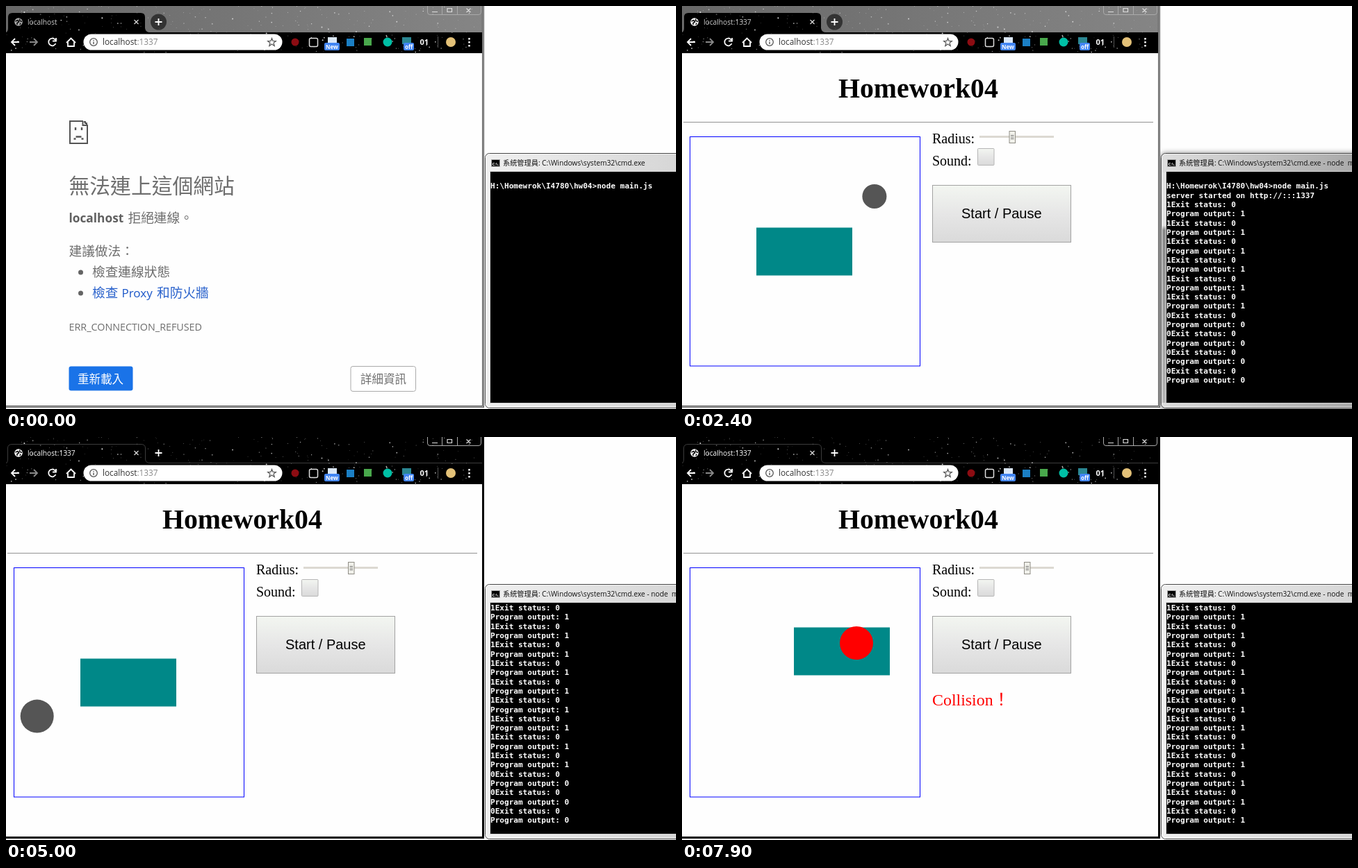
Recreate the animation shown at these times as an HTML page. Size 964 by 581 pixels, loop 8 s.

```html
<!DOCTYPE html>
<html lang="zh-Hant">
<head>
<meta charset="utf-8">
<title>Homework04</title>
<style>
html, body { margin: 0; width: 100%; height: 100%; overflow: hidden; background: #fefefe; }
svg { display: block; }
text { white-space: pre; font-family: "Open Sans", "Noto Sans CJK TC", "Noto Sans CJK", sans-serif; }
.serif text { font-family: "Liberation Serif", "Noto Sans CJK TC", "Noto Sans CJK", serif; font-size: 20px; }
#console text { font: bold 11.07px "DejaVu Sans Mono", monospace; fill: #fff; }
#error text { fill: #6e6e6e; font-size: 18.7px; font-weight: 300; }
.line { fill: none; stroke: #fff; stroke-width: 1.8; }
.thin { fill: none; stroke: #ddd; stroke-width: 1.2; }
</style>
</head>
<body>
<svg width="964" height="581" viewBox="0 0 964 581">
  <defs>
    <linearGradient id="strip"><stop stop-color="#686868"/><stop offset="1" stop-color="#858585"/></linearGradient>
    <linearGradient id="key" x2="0" y2="1"><stop stop-color="#f3f6f1"/><stop offset=".5" stop-color="#e6e6e6"/><stop offset="1" stop-color="#dadada"/></linearGradient>
    <linearGradient id="focused"><stop stop-color="#dedede"/><stop offset="1" stop-color="#a2a2a2"/></linearGradient>
    <linearGradient id="blurred"><stop stop-color="#f0f0f0"/><stop offset="1" stop-color="#d2d2d2"/></linearGradient>
    <linearGradient id="side" x2="0" y2="1"><stop offset=".23" stop-color="#e4e4e4"/><stop offset=".25" stop-color="#8c8c8c"/><stop offset="1" stop-color="#b8b8b8"/></linearGradient>
    <filter id="shade" x="-10%" y="-10%" width="120%" height="120%"><feDropShadow dx="0" dy="1" stdDeviation="4" flood-opacity=".6"/></filter>
    <clipPath id="frame"><rect width="964" height="581"/></clipPath>
  </defs>

  <!-- command window -->
  <g clip-path="url(#frame)">
    <rect id="win" x="689.5" y="212.5" width="320" height="367" rx="6" stroke="#444"/>
    <rect x="690.5" y="213.5" width="318" height="365" rx="5" fill="none" stroke="#fff" stroke-opacity=".7"/>
    <rect id="edge" x="691" y="240" width="5" height="332" fill="url(#side)"/>
    <rect x="696.5" y="238.500" width="300" height="334" stroke="#d4d4d4"/>
    <rect x="698.5" y="221.5" width="12" height="10" fill="#000" stroke="#aaa"/>
    <text x="699.5" y="229.5" font-size="6" font-weight="bold" fill="#fff">C:\.</text>
    <text x="715" y="230" font-size="10.2" fill="#111">系統管理員:</text>
    <text id="caption" x="771" y="230" font-size="10.2" fill="#111"></text>
    <g id="console"></g>
    <rect id="caret" x="931" y="263" width="6" height="3" fill="#fff"/>
  </g>

  <!-- browser frame -->
  <rect width="688" height="579" fill="#fefefe"/>
  <rect width="688" height="68"/>
  <g id="idle">
    <rect width="688" height="38" fill="url(#strip)"/>
    <path d="M0 38Q3 37 3 32V16Q3 10 9 10H194Q200 10 200 16V32Q201 38 207 38Z"/>
    <circle cx="219.5" cy="23" r="11.5" fill="#333"/>
  </g>
  <path id="tabline" d="M0 37.5Q2.5 37 2.5 32V16Q2.5 10.5 9 10.5H194Q200.5 10.5 200.5 16V32Q201 37.5 207 37.5H686" fill="none" stroke="#3c3c3c"/>
  <g id="stars" fill="#fff"></g>
  <path id="border" d="M686.5 0V577.5H0" fill="none" stroke-width="3"/>
  <path id="groove" d="M686.5 0V577.5H0" fill="none" stroke="#b4b4b4"/>
  <path d="M606.5 0V9Q606.5 12.5 610 12.5H680Q683.5 12.5 683.5 9V0M627.5 0V12M649.5 0V12" fill="none" stroke="#aaa"/>
  <path d="M613 8.5H621M635 3.500H641.500V8.500H635ZM662.5 3.500L668.500 9M668.500 3.500L662.500 9" class="thin"/>
  <path d="M219.5 18V28M214.5 23H224.5" class="line"/>
  <path d="M184.5 20L190.5 26M190.5 20L184.5 26" class="thin"/>
  <g id="globe"><circle cx="18" cy="23" r="5.8"/><path d="M13.5 22L17 20.5L18.5 23L16 24.5V27M20 18.5L19.5 21L23 22.5M20 27L21 24.5" fill="none" stroke="#111" stroke-width="1.6"/></g>
  <path id="spin" d="M19 18A5 5 0 0 1 20 28" class="line"/>
  <text id="tab" x="31" y="27" font-size="10.2"></text>
  <path d="M19 52H8M13 47L8 52L13 57" class="line"/>
  <path d="M34 52H45M40 47L45 52L40 57" class="line" style="stroke:#888"/>
  <path id="reload" d="M71 49A5.3 5.3 0 1 0 71.5 54M72 46V50.5H67" class="line"/>
  <path id="stop" d="M62 47.5L71 56.5M71 47.5L62 56.5" class="line"/>
  <path d="M87 53L93.5 46.5L100 53M89 52V58H98V52" class="line"/>
  <rect x="111.5" y="40.5" width="286" height="23" rx="11.5" fill="#fff"/>
  <circle cx="126" cy="52" r="5.3" fill="none" stroke="#555" stroke-width="1.3"/>
  <path d="M126 49V50.3M126 51.5V55" stroke="#555" stroke-width="1.4"/>
  <text x="139" y="56" font-size="11.8" fill="#333">localhost<tspan fill="#888">:1337</tspan></text>
  <path d="M382.5 46.5L384 50.5H388.3L385 53.2L386.2 57.5L382.5 55L378.8 57.5L380 53.2L376.7 50.5H381Z" fill="none" stroke="#555" stroke-width="1.2"/>
  <circle cx="416" cy="52" r="5.5" fill="#8c0c12"/>
  <rect x="436.500" y="46.500" width="12" height="12" rx="2" fill="none" stroke="#ddd" stroke-width="1.500"/>
  <rect x="463" y="45" width="13" height="9" fill="#dce8f8"/>
  <rect x="490" y="47" width="11" height="11" fill="#1b7fc4"/>
  <rect x="515" y="46" width="11" height="11" fill="#49a84c"/>
  <circle cx="549" cy="52" r="6.5" fill="#00bfa5"/>
  <rect x="570" y="45" width="13" height="10" fill="#2b8793"/>
  <g fill="#4285f4"><rect x="458" y="53" width="22" height="11" rx="2"/><rect x="572" y="53" width="15" height="11" rx="2"/></g>
  <g fill="#fff" font-weight="bold"><text x="460" y="61.5" font-size="8">New</text><text x="574" y="61.5" font-size="8">off</text><text x="595.5" y="56" font-size="11">01</text></g>
  <path d="M621.5 44V60" stroke="#555"/>
  <circle cx="640" cy="52" r="7" fill="#e3c178"/>
  <path d="M666.5 46V48.5M666.5 51V53.5M666.5 56V58.5" stroke="#fff" stroke-width="2.5"/>

  <!-- failed page -->
  <g id="error">
    <path d="M111 166H92V198H117V172H110.500V166M112 167H114V169H116V171" fill="none" stroke="#555" stroke-width="2"/>
    <path d="M100 175V179M109 175V179M97.500 191.500H100.500M100.500 188.500H108.500M108.500 191.500H111.500" fill="none" stroke="#555" stroke-width="2.4"/>
    <text x="90.5" y="270" style="font-size:29.8px">無法連上這個網站</text>
    <text x="90.5" y="312" style="font-size:17.3px;font-weight:700;fill:#606060">localhost</text>
    <text x="175.5" y="312">拒絕連線。</text>
    <text x="90.5" y="360">建議做法：</text>
    <circle cx="107.5" cy="384" r="3.5" fill="#646464"/><circle cx="107.5" cy="414" r="3.5" fill="#646464"/>
    <text x="124" y="390">檢查連線狀態</text>
    <text x="124" y="420" style="fill:#2a62cc">檢查</text>
    <text x="166.5" y="420" style="fill:#1a56c8;font-size:17px;font-weight:400">Proxy</text>
    <text x="217" y="420" style="fill:#2a62cc">和防火牆</text>
    <text x="90.5" y="468" style="font-size:14.3px;font-weight:400">ERR_CONNECTION_REFUSED</text>
    <rect x="90.5" y="519.5" width="92" height="35" rx="3" fill="#1a73e8"/>
    <text x="103" y="544" style="font-size:16.5px;fill:#fff;font-weight:400">重新載入</text>
    <rect x="496" y="519.5" width="93.5" height="36" rx="3" fill="#fff" stroke="#aaa"/>
    <text x="510" y="544" style="font-size:16.5px;font-weight:400">詳細資訊</text>
  </g>

  <!-- homework page -->
  <g id="page" class="serif">
    <text x="225" y="132" style="font-size:39.8px;font-weight:bold">Homework04</text>
    <path d="M2 167.5H678" stroke="#929292"/>
    <text x="360" y="198">Radius:</text>
    <text x="360" y="230">Sound:</text>
    <rect x="428" y="187" width="107" height="3" fill="#dcd9d2"/>
    <g id="thumb"><rect x="-4" y="180.5" width="8.5" height="17" fill="#f0f0ea" stroke="#8f8d85"/><path d="M-2 186.5H2.5M-2 189H2.5M-2 191.5H2.5" stroke="#777"/></g>
    <rect x="425.5" y="205.5" width="23.5" height="24" rx="1" fill="url(#key)" stroke="#b5b5b5"/>
    <rect x="360.5" y="258.5" width="199" height="82" fill="url(#key)" stroke="#a2a2a2"/>
    <text x="402" y="306" style="font-family:'Liberation Sans',sans-serif">Start / Pause</text>
    <text id="alert" x="360" y="387" fill="red" style="font-size:23.9px">Collision！</text>
    <g id="board">
      <rect x="11.5" y="188.5" width="331" height="330.5" fill="none" stroke="#00f"/>
      <rect id="block" width="138" height="69" fill="#088"/>
      <circle id="ball"/>
    </g>
  </g>
</svg>
<script>
const $ = id => document.getElementById(id);
const set = (id, attrs) => { for (const k in attrs) $(id).setAttribute(k, attrs[k]); };
const show = (id, on) => { $(id).style.display = on ? '' : 'none'; };

const LOOP = 8000, STEP = 100, ROWS = 24;

// [time, x, y]: straight runs between bounces
const ballPath = [[1620, 176.5, 353.5], [2770, 324.5, 237], [3065, 288, 206.5], [3200, 271.5, 220],
  [4100, 159.5, 309.5], [5072, 35.5, 410], [5800, 128.5, 486], [5885, 139, 495], [7364, 318, 350.5], [7900, 251, 297]];
const blockPath = [[5100, 107, 319.5], [5200, 122, 319.5], [5400, 122, 319.5], [5800, 122, 384],
  [7100, 122, 384], [7300, 161, 274.5]];
// [time, slider x, radius]
const sliderPath = [[3700, 475, 17.5], [3900, 496.5, 24]];
// collision checks: [start, interval, count, result]
const checks = [[1700, 75, 6, 1], [2200, 60, 26, 0], [3780, 30, 31, 1], [4720, 125, 11, 0],
  [6100, 50, 20, 1], [7100, 40, 3, 0], [7220, 30, 26, 1]];

function along(path, t) {
  const i = path.findIndex(p => p[0] > t);
  if (i === 0) return path[0].slice(1);
  if (i < 0) return path[path.length - 1].slice(1);
  const a = path[i - 1], b = path[i], k = (t - a[0]) / (b[0] - a[0]);
  return [1, 2].map(j => a[j] + (b[j] - a[j]) * k);
}

let seed = 7;
const rand = () => (seed = (seed * 16807) % 2147483647) / 2147483647;
let dots = '';
for (let i = 0; i < 300; i++) {
  const r = 0.4 + rand() ** 4 * 0.7;
  dots += `<circle cx="${rand() * 684}" cy="${rand() * 67}" r="${r}" opacity="${0.3 + rand() * 0.6}"/>`;
}
$('stars').innerHTML = dots;

let rowsMarkup = '';
for (let i = 0; i < ROWS; i++) rowsMarkup += `<text x="697" y="${250 + i * 13.32}"></text>`;
$('console').innerHTML = rowsMarkup;
const rows = [...$('console').children];

function consoleLines(t) {
  const lines = ['', 'H:\\Homewrok\\I4780\\hw04>node main.js'];
  if (t >= 1300) lines.push('server started on http://:::1337');
  for (const [start, gap, count, hit] of checks)
    for (let i = 0; i < count && start + i * gap <= t; i++)
      lines.push(hit + 'Exit status: 0', 'Program output: ' + hit);
  return lines.slice(-ROWS);
}

function draw(t) {
  const browserOn = t >= 3600, consoleOn = t >= 400 && !browserOn;
  const loaded = t >= 1650, loading = t >= 1500 && t < 2200;

  show('idle', !browserOn);
  show('groove', !browserOn);
  show('tabline', browserOn);
  set('border', { stroke: browserOn ? '#000' : '#555' });
  set('win', { fill: `url(#${consoleOn ? 'focused' : 'blurred'})`, filter: consoleOn ? 'url(#shade)' : 'none' });
  show('edge', consoleOn);
  show('caret', t >= 400 && t < 900);
  $('caption').textContent = 'C:\\Windows\\system32\\cmd.exe' + (t >= 1300 ? ' - node  main.js' : '');
  const lines = consoleLines(t);
  rows.forEach((row, i) => { row.textContent = lines[i] || ''; });

  show('globe', !loading);
  set('globe', { fill: loaded ? '#fff' : '#aaa' });
  show('spin', loading && t >= 1600);
  set('spin', { transform: `rotate(${(t - 1700) * 0.36} 18 23)` });
  show('reload', !loading);
  show('stop', loading);
  $('tab').textContent = t >= 1900 ? 'localhost:1337' : 'localhost';
  set('tab', { fill: browserOn ? '#fff' : '#ccc' });

  show('error', !loaded);
  show('page', loaded);
  show('board', t >= 1800);
  const last = checks.filter(c => c[0] <= t).pop();
  const hit = t >= 1800 && last[3] === 1;
  show('alert', hit);
  const [knob, r] = along(sliderPath, t);
  const [cx, cy] = along(ballPath, t);
  const [x, y] = along(blockPath, t);
  set('thumb', { transform: `translate(${knob})` });
  set('ball', { cx, cy, r, fill: hit ? 'red' : '#555' });
  set('block', { x, y });
}

const begin = performance.now();
function tick() {
  const t = (performance.now() - begin) % LOOP;
  draw(Math.floor(t / STEP) * STEP);
  requestAnimationFrame(tick);
}
tick();
</script>
</body>
</html>
```
